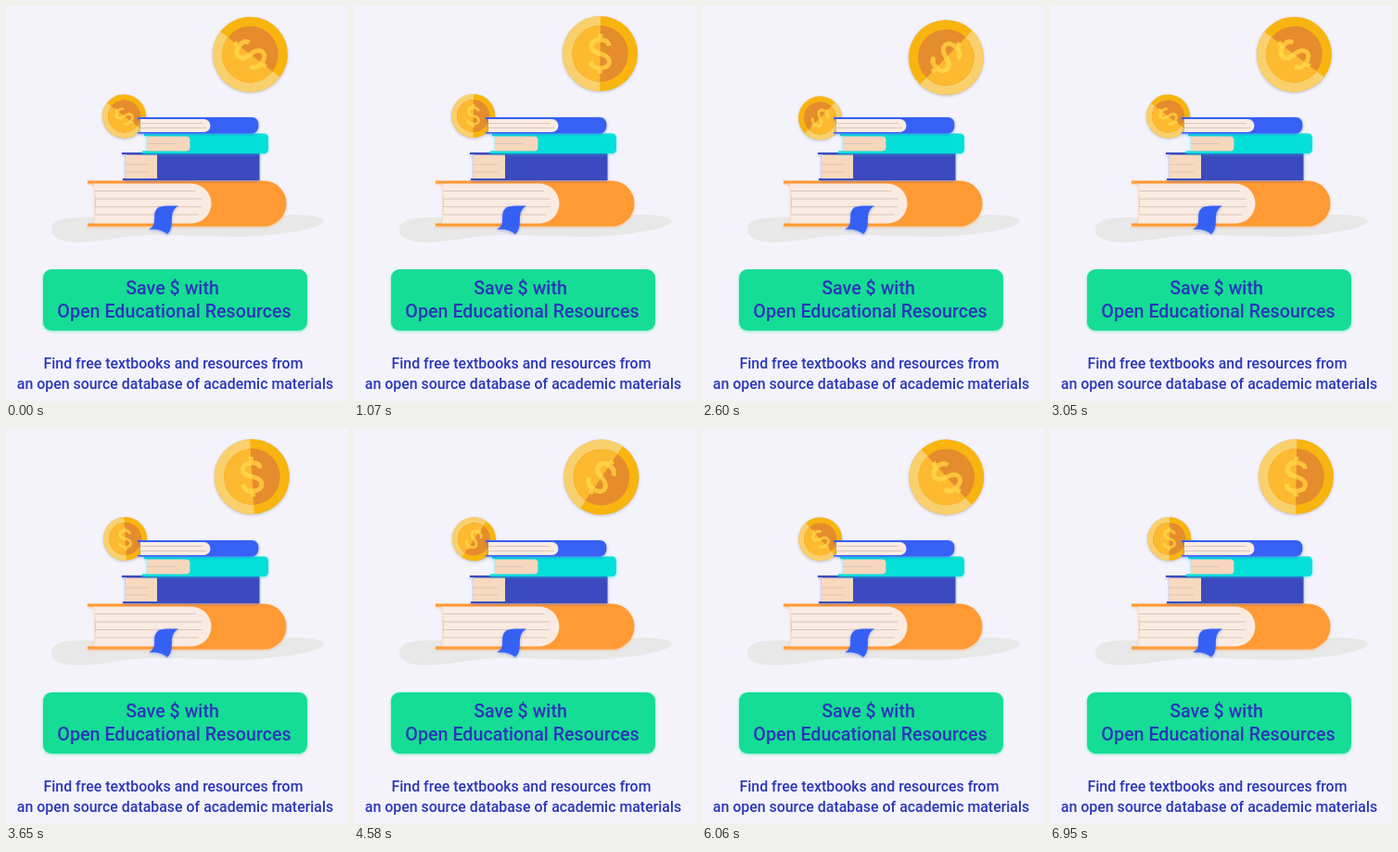
Animation of 369 by 426 pixels, one loop 7 s. Source, as an HTML page:

```html
<!DOCTYPE html>
<html lang="en">
<head>
<meta charset="utf-8">
<title>Open Educational Resources</title>
<style>
  html, body { margin: 0; width: 100%; height: 100%; overflow: hidden; background: #f4f3fb; }
  svg { display: block; width: 369px; height: 426px; }
  text { font-family: Roboto, sans-serif; font-weight: 500; fill: #2a36b9; text-anchor: middle; }
  .soft { filter: drop-shadow(0 1px 1.5px color-mix(in srgb, currentColor 55%, transparent)); }
  .rules { fill: none; stroke: #dcc6b8; stroke-width: 1.2; }
  .sign { fill: none; stroke-width: 5; }
</style>
</head>
<body>
<svg viewBox="0 0 369 426">
  <defs>
    <path id="dollar" d="M9.5-8.5C9-13 5.500-15 0-15C-6-15-9.500-12-9.500-8C-9.500-3-5-1.500 0 0C5.500 1.500 10 3.500 10 8.500C10 13 6 15.500 0 15.500C-6 15.500-10 13-10 8M0-21.500V-15M0 15V21.500"/>
    <clipPath id="left"><path d="M-41-41H0V41H-41z"/></clipPath>
    <!-- The coin sits slightly off the point it turns around. -->
    <g id="coin" transform="translate(.3 -2.5)">
      <circle r="40.5" fill="#f8b40f"/>
      <circle r="40.5" fill="#f9d06c" clip-path="url(#left)"/>
      <circle r="30.3" fill="#e58c2d"/>
      <circle r="30.3" fill="#fdb92f" clip-path="url(#left)"/>
      <use class="sign" href="#dollar" stroke="#fcc23b"/>
      <g clip-path="url(#left)"><use class="sign" href="#dollar" stroke="#ffd246"/></g>
    </g>
  </defs>

  <path d="M49 241C49 228 70 228 90 228L285 227C320 222 343 227 343 232C343 238 310 246 265 248.500C215 250 170 244 130 249C110 252 90 255 76 255C58 254 49 250 49 241z" fill="#e8e8e8"/>

  <g class="soft" color="#99a"><g transform="translate(265.3 53.9)"><use class="spin" href="#coin"/></g></g>
  <g class="soft" color="#99a"><g transform="translate(128.6 119.9) scale(.58)"><use class="spin" href="#coin"/></g></g>

  <g class="soft" color="#ff9a34">
    <path d="M88 188.500H278a24.500 24.500 0 0 1 0 49H88v-3H96V191.500H88z" fill="currentColor"/>
    <path d="M95 191.500H200a21.500 21.500 0 0 1 0 43H95Q98 213 95 191.500z" fill="#f9ebe1"/>
    <path class="rules" d="M96 199.500H205M96 208H211M96 216.500H211M96 225H208"/>
  </g>
  <path class="soft" color="#3560f4" d="M165 217C170 215 178 215.500 186 215.500C173 223 184 237 174 246C169 241 161 240 154 241C166 235 155 224 165 217z" fill="currentColor"/>

  <g class="soft" color="#3b4bbf">
    <path d="M125 158H273.500V188H126V186H130V160H125z" fill="currentColor"/>
    <path d="M129 160.500H163V186H129z" fill="#f8d9c0"/>
    <path class="rules" d="M129 171H155M129 179H155"/>
  </g>
  <g class="soft" color="#03dfd9">
    <path d="M149 137.500H278q5 0 5 5V154q0 5-5 5H147V156.500H152V140H149z" fill="currentColor"/>
    <path d="M152 140.500H194q4.500 0 4.500 4V152.500q0 4-4.500 4H152z" fill="#f6d6bd"/>
    <path class="rules" d="M152 148.500H183"/>
  </g>
  <g class="soft" color="#3761f5">
    <path d="M142 120H265q7.500 0 7.500 8.500T265 137.500H142V136H145V122H142z" fill="currentColor"/>
    <path d="M145 122H213.500a7 7 0 0 1 0 14H145z" fill="#faebe2"/>
    <path class="rules" d="M145 126.500H212M145 131.500H216"/>
  </g>

  <rect class="soft" color="#15dd95" x="40" y="284" width="285" height="66" rx="9" fill="currentColor"/>
  <g font-size="19.7">
    <text x="179.500" y="311">Save $ with</text>
    <text x="181.500" y="336">Open Educational Resources</text>
  </g>
  <g font-size="15.9">
    <text x="180.500" y="391">Find free textbooks and resources from</text>
    <text x="182.500" y="413">an open source database of academic materials</text>
  </g>
</svg>
<script>
  const LOOP = 7000, TURN = 2930, START = 960, POWER = 2.2;
  const coins = document.querySelectorAll('.spin');
  const ease = x => x < .5 ? (2 * x) ** POWER / 2 : 1 - (2 - 2 * x) ** POWER / 2;

  // The opening move runs fast, then rests until the regular turns take over.
  const warp = t => t < 390 ? 120 + t * 620 / 390 : Math.max(t, 740);

  function draw(now) {
    const t = warp(now % LOOP);
    const x = (t - START + TURN) / TURN % 1;
    const angle = 360 * ease(x);
    for (const coin of coins) coin.setAttribute('transform', `rotate(${angle})`);
    requestAnimationFrame(draw);
  }
  draw(performance.now());
</script>
</body>
</html>
```
